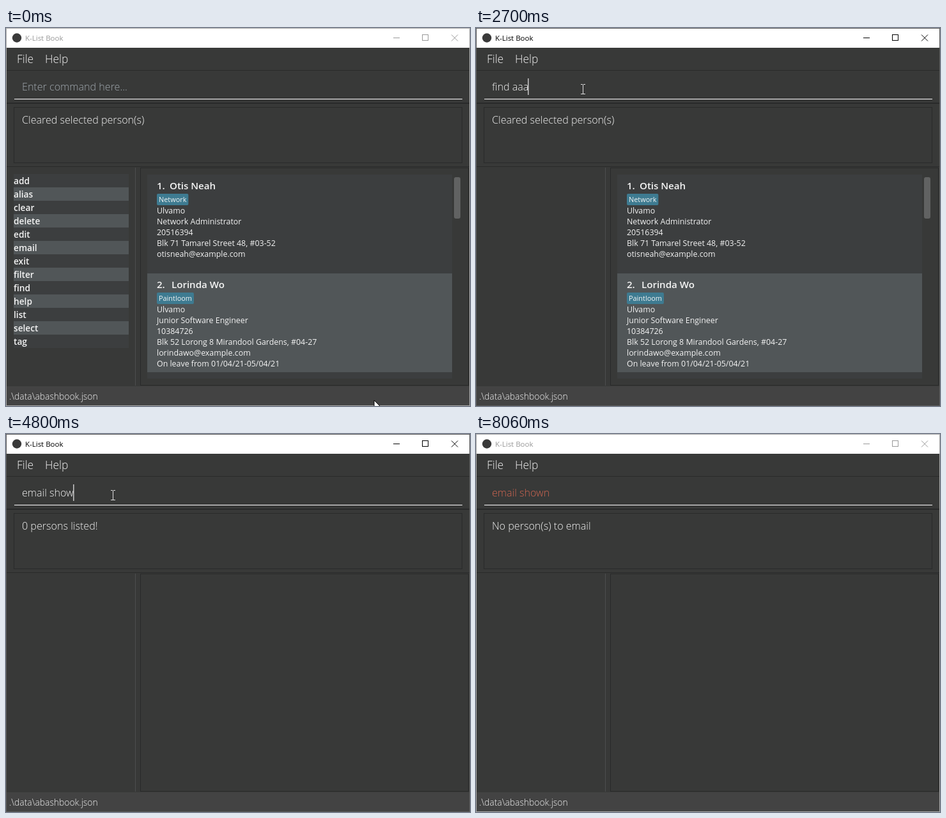
Write an HTML page with a canvas that moves like this. It is 726 px wide and 593 px high and loops after 8140 ms.

```html
<!DOCTYPE html>
<html lang="en">
<head>
<meta charset="utf-8">
<title>Address book</title>
<style>
  html, body { margin: 0; width: 100%; height: 100%; overflow: hidden; background: #383938; }
  canvas { display: block; }
</style>
</head>
<body>
<canvas id="stage" width="726" height="593"></canvas>
<script>
const LOOP = 8140;
const TICK = LOOP / 105;
const ctx = document.getElementById('stage').getContext('2d', { alpha: false });

const COMMANDS = ['add', 'alias', 'clear', 'delete', 'edit', 'email', 'exit',
  'filter', 'find', 'help', 'list', 'select', 'tag'];

const PEOPLE = [
  { name: 'Otis Neah', tag: 'Network', lines: ['Ulvamo', 'Network Administrator', '20516394',
    'Blk 71 Tamarel Street 48, #03-52', 'otisneah@example.com'] },
  { name: 'Lorinda Wo', tag: 'Paintloom', lines: ['Ulvamo', 'Junior Software Engineer', '10384726',
    'Blk 52 Lorong 8 Mirandool Gardens, #04-27', 'lorindawo@example.com',
    'On leave from 01/04/21-05/04/21'] }
];

// Each step changes part of the window state.
const STEPS = [
  [0, { active: false, prompt: true, caret: false, error: false, people: true,
        text: '', filter: '', message: 'Cleared selected person(s)' }],
  [690, { active: true }],
  [770, { prompt: false, caret: true }],
  [1080, { text: 'f' }],
  [1230, { filter: 'f' }],
  [1460, { text: 'fi' }],
  [1610, { text: 'fin' }],
  [1690, { filter: 'fin' }],
  [1770, { text: 'find' }],
  [1850, { text: 'find ' }],
  [1930, { filter: 'find ' }],
  [2160, { text: 'find a' }],
  [2550, { text: 'find aa' }],
  [2700, { text: 'find aaa' }],
  [3010, { text: '', message: '0 persons listed!', people: false }],
  [3170, { filter: '' }],
  [3560, { caret: false }],
  [3630, { text: 'e', caret: true }],
  [3790, { text: 'em', filter: 'e' }],
  [3870, { text: 'ema', filter: 'em' }],
  [4020, { text: 'emai' }],
  [4180, { text: 'email' }],
  [4330, { text: 'email ' }],
  [4410, { text: 'email s', filter: 'email ' }],
  [4650, { text: 'email sh' }],
  [4720, { text: 'email sho' }],
  [4800, { text: 'email show' }],
  [4960, { text: 'email shown' }],
  [5190, { error: true, message: 'No person(s) to email' }],
  [5650, { caret: false }],
  [6190, { caret: true }],
  [6650, { caret: false }],
  [7210, { caret: true }],
  [7680, { caret: false }],
  [8060, { active: false }]
];

// Pointer path: time, x, y.
const PATH = [
  [0, 576, 584], [78, 566, 570], [155, 486, 480], [233, 372, 345], [310, 268, 218],
  [388, 202, 138], [465, 173, 103], [543, 167, 96], [5814, 167, 96], [5891, 167, 98],
  [6124, 169, 103], [6279, 212, 148], [6434, 150, 186], [6589, 40, 172], [6667, 8, 150],
  [6822, 20, 168], [7054, 120, 205], [7287, 240, 225], [7520, 352, 235],
  [7597, 410, 285], [7830, 680, 568]
];
const POINTER_LEAVES = 7905;

function rect(color, x, y, w, h) {
  ctx.fillStyle = color;
  ctx.fillRect(x, y, w, h);
}

function frame(color, x, y, w, h) {
  ctx.strokeStyle = color;
  ctx.lineWidth = 1;
  ctx.strokeRect(x + .5, y + .5, w - 1, h - 1);
}

function rounded(color, x, y, w, h, r) {
  ctx.fillStyle = color;
  ctx.beginPath();
  ctx.roundRect(x, y, w, h, r);
  ctx.fill();
}

function setFont(size, weight) {
  ctx.font = `${weight} ${size}px "Open Sans", "Noto Sans", sans-serif`;
}

function label(text, x, y, size, weight = 400, color = '#f4f4f4') {
  setFont(size, weight);
  ctx.fillStyle = color;
  ctx.fillText(text, x, y);
  return ctx.measureText(text).width;
}

function drawTitle(active) {
  const ink = active ? '#000' : '#999';
  rect('#fff', 0, 0, 726, 31);
  ctx.fillStyle = '#3a3a3a';
  ctx.beginPath();
  ctx.arc(17, 15.5, 7.2, 0, 7);
  ctx.fill();
  label('K-List Book', 30, 20, 11.5, 400, ink);
  rect(ink, 606, 15, 10, 1);
  frame(ink, 651, 10, 10, 10);
  ctx.beginPath();
  ctx.moveTo(697, 10.5);
  ctx.lineTo(707, 20.5);
  ctx.moveTo(707, 10.5);
  ctx.lineTo(697, 20.5);
  ctx.stroke();
}

function drawPanels() {
  const line = '#292a2a';
  label('File', 17, 55, 17.4, 300);
  label('Help', 61, 55, 17.4, 300);
  rect(line, 1, 66, 724, 1);
  rect('#fff', 13, 111, 701, 1);
  rect(line, 1, 117, 724, 2);
  frame(line, 12, 124, 702, 88);
  rect(line, 1, 217, 724, 1);
  rect('#4d4e4e', 202, 219, 1, 342);
  frame(line, 210, 219, 514, 342);
  rect('#434343', 1, 562, 724, 30);
  label('.\\data\\abashbook.json', 5, 583, 13.9, 300);
}

function drawInput(s) {
  const size = 16.1;
  if (s.prompt) label('Enter command here...', 25, 98, size, 300, '#a0a8ae');
  const width = label(s.text, 25, 98, size, 300, s.error ? '#d06651' : '#f4f4f4');
  if (s.caret) rect('#c8c8c8', Math.round(24 + width), 79, 1.5, 26);
  label(s.message, 25, 150, size, 300);
}

function drawCommands(filter) {
  COMMANDS.filter(c => c.startsWith(filter)).forEach((command, i) => {
    const y = 229 + 21 * i;
    rect(i % 2 ? '#515658' : '#3c3e3f', 12, y, 180, 21);
    label(command, 12, y + 16, 13.7, 600);
  });
}

function drawPeople() {
  PEOPLE.forEach((person, i) => {
    const y = 230 + 155 * i;
    rect(i % 2 ? '#515658' : '#3c3e3f', 221, y, 477, 155);
    label(`${i + 1}.`, 236, y + 23, 15.1, 600);
    label(person.name, 256 + 3 * i, y + 23, 15.1, 600);
    setFont(10.9, 400);
    rounded('#3e7b91', 236, y + 30, ctx.measureText(person.tag).width + 6, 18, 2);
    label(person.tag, 239, y + 43, 10.9);
    person.lines.forEach((text, n) => label(text, 236, y + 61 + 17 * n, 12.4));
  });
  rect('#3c3e3f', 221, 540, 477, 10);
  rounded('#616262', 701, 234, 10, 65, 3);
}

function drawPointer(time) {
  const t = Math.floor(time / TICK + .2) * TICK;
  if (t >= POINTER_LEAVES - 5) return;
  const next = PATH.findIndex(p => p[0] > t);
  const b = PATH[next < 0 ? PATH.length - 1 : next];
  const a = PATH[next < 0 ? PATH.length - 1 : next - 1];
  const k = b === a ? 0 : (t - a[0]) / (b[0] - a[0]);
  const x = Math.round(a[1] + (b[1] - a[1]) * k);
  const y = Math.round(a[2] + (b[2] - a[2]) * k);
  const overText = x > 12 && x < 714 && (y > 78 && y < 112 || y > 124 && y < 212);
  if (overText) {
    rect('#ddd', x, y - 7, 1, 15);
    for (const edge of [y - 8, y + 7]) {
      rect('#ddd', x - 3, edge, 3, 1);
      rect('#ddd', x + 1, edge, 3, 1);
    }
    return;
  }
  ctx.save();
  ctx.translate(x, y);
  const arrow = new Path2D('M0 0V16L3.7 12.5 6.2 18.3 8.7 17.2 6.2 11.5H11.3Z');
  ctx.fillStyle = '#fff';
  ctx.fill(arrow);
  ctx.strokeStyle = '#000';
  ctx.lineWidth = 1;
  ctx.stroke(arrow);
  ctx.restore();
}

function draw(time) {
  const s = Object.assign({}, ...STEPS.filter(step => step[0] <= time).map(step => step[1]));
  rect('#383938', 0, 0, 726, 593);
  drawTitle(s.active);
  drawPanels();
  drawInput(s);
  drawCommands(s.filter);
  if (s.people) drawPeople();
  frame(s.active ? '#5a5a5a' : '#a9a9a9', 0, 0, 726, 593);
  drawPointer(time);
}

const start = performance.now();
function tick() {
  draw((performance.now() - start) % LOOP);
  requestAnimationFrame(tick);
}
tick();
</script>
</body>
</html>
```
